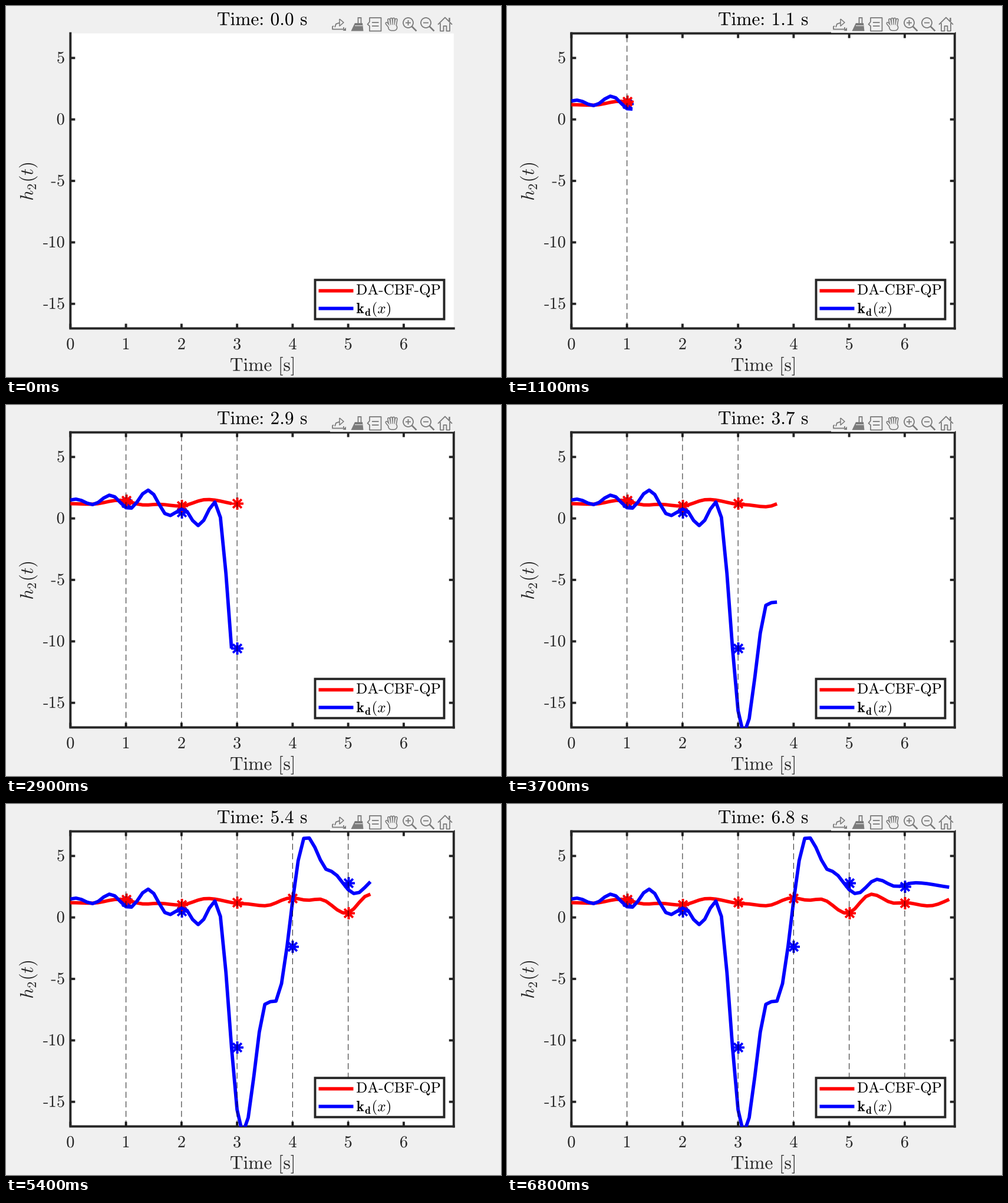
A matplotlib script that plays this animation: 840x630 px, repeating every 6.9 s.

```python
import matplotlib.pyplot as plt
import numpy as np
from matplotlib.animation import FuncAnimation
from matplotlib.patches import Circle, PathPatch, Polygon, Rectangle
from matplotlib.path import Path
from matplotlib.textpath import TextPath
from matplotlib.transforms import Affine2D

plt.rcParams.update({'mathtext.fontset': 'cm', 'path.snap': False})

W, H, DPI = 840, 630, 100
PX = 72 / DPI  # points per pixel
LEFT, RIGHT, TOP, BOTTOM = 109.3, 759.8, 46.5, 547.5
BACK, INK, ICON = '#f0f0f0', '#262626', '#7b7b7b'
TICK, LABEL, LEGEND = 28.5, 31.4, 25.2
AXIS, CURVE = 3.9, 5.8
STEPS = 69

fig = plt.figure(figsize=(W / DPI, H / DPI), dpi=DPI, facecolor=BACK)
ax = fig.add_axes([0, 0, 1, 1])
ax.set_xlim(0, W)
ax.set_ylim(H, 0)
ax.axis('off')


def px(t):
    return LEFT + np.asarray(t) * (RIGHT - LEFT) / 6.9


def py(h):
    return TOP + (7 - np.asarray(h)) * (BOTTOM - TOP) / 24


def line(xs, ys, width, color=INK, z=2, **kw):
    kw = {'solid_capstyle': 'butt', 'solid_joinstyle': 'round', **kw}
    return ax.plot(xs, ys, color=color, lw=width * PX, zorder=z, **kw)[0]


def block(x0, y0, x1, y1, color, z, edge='none', width=0):
    return ax.add_patch(Rectangle((x0, y0), x1 - x0, y1 - y0, facecolor=color,
                                  edgecolor=edge, lw=width * PX, zorder=z))


def outline(s, size):
    """Path and ink width of a text line; hyphens are drawn as bars."""
    parts, x = [], 0
    for i, piece in enumerate([s] if '$' in s else s.split('-')):
        if i:
            x += 0.04 * size if parts else 0
            x1 = x + 0.265 * size
            y0, y1 = 0.187 * size, 0.245 * size
            parts.append(Path([(x, y0), (x1, y0), (x1, y1), (x, y1), (x, y0)],
                              closed=True))
            x = x1 + 0.113 * size
        if piece:
            tex = piece if '$' in piece else rf'$\mathrm{{{piece}}}$'
            path = TextPath((0, 0), tex, size=size)
            box = path.get_extents()
            parts.append(path.transformed(Affine2D().translate(x - box.x0, 0)))
            x += box.width
    return Path.make_compound_path(*parts), x


def text_path(x, y, s, size, align=0, turn=0):
    path, width = outline(s, size)
    move = Affine2D().translate(-align * width, 0).rotate_deg(turn)
    return path.transformed(move.scale(1, -1).translate(x, y))


def write(x, y, s, size, color=INK, align=0, turn=0, z=2):
    patch = PathPatch(text_path(x, y, s, size, align, turn),
                      facecolor=color, lw=0, zorder=z)
    return ax.add_patch(patch)


def title_path(i):
    s = (r'$\mathrm{Time\hspace{-0.2}:\hspace{0.18}%.1f\hspace{0.38}s}$'
         % (i / 10))
    return text_path(359, 32.6, s, LABEL)


def wave(t, keys):
    """Cosine easing from each (time, value) key to the next."""
    times, values = np.array(keys).T
    i = np.searchsorted(times, t, side='right') - 1
    u = (t - times[i]) / (times[i + 1] - times[i])
    return values[i] + (values[i + 1] - values[i]) * (1 - np.cos(np.pi * u)) / 2


# Axes; the closing half of the box appears later
SQUARE = {'solid_capstyle': 'projecting', 'solid_joinstyle': 'miter'}
block(LEFT, TOP, RIGHT, BOTTOM, 'white', 0)
line([LEFT, LEFT, RIGHT], [TOP, BOTTOM, BOTTOM], AXIS, **SQUARE)
late = [line([LEFT, RIGHT, RIGHT], [TOP, TOP, BOTTOM], AXIS, **SQUARE),
        block(550, 43, 760, 45.5, 'white', 3)]
for t in range(7):
    x = px(t)
    line([x, x], [BOTTOM, BOTTOM - 8], AXIS)
    late.append(line([x, x], [TOP, TOP + 8], AXIS))
    write(x, 583, str(t), TICK, align=0.5)
for h in range(-15, 6, 5):
    y = py(h)
    line([LEFT, LEFT + 8], [y, y], AXIS)
    late.append(line([RIGHT, RIGHT - 8], [y, y], AXIS))
    write(98.7, y + 8.6, str(h), TICK, align=1)

write(381, 619.5, r'$\mathrm{Time\hspace{0.38}[s]}$', LABEL)
write(45.6, 329, '$h_2(t)$', LABEL, turn=90)
title = ax.add_patch(PathPatch(title_path(0), facecolor='black', lw=0))

# Curves: turning points, sampled every 0.1 s
time = np.arange(STEPS) / 10
safe = wave(time, [
    (0, 1.2), (0.38, 1.16), (0.88, 1.48), (1.35, 1.09), (1.58, 1.15),
    (1.97, 1.01), (2.46, 1.54), (3.1, 1.12), (3.5, 0.95), (3.98, 1.59),
    (4.27, 1.4), (4.48, 1.49), (4.96, 0.34), (5.4, 1.89), (5.82, 1.16),
    (6, 1.2), (6.43, 0.94), (7.05, 1.75)])
nominal = wave(time, [
    (0, 1.5), (0.1, 1.57), (0.4, 1.13), (0.72, 1.9), (1.06, 0.79),
    (1.4, 2.3), (1.77, 0.22), (2.03, 0.78), (2.3, -0.58), (2.62, 1.35),
    (3.1, -17.6), (3.54, -6.85), (3.68, -6.85), (4.24, 6.6), (4.66, 3.78),
    (5.13, 1.93), (5.5, 3.1), (5.85, 2.52), (6.18, 2.82), (7, 2.4)])

clip = block(LEFT, TOP, RIGHT, BOTTOM, 'none', 0)
curves = []
for values, color, z in ((safe, 'red', 6), (nominal, 'blue', 7)):
    curve = line([], [], CURVE, color, z)
    curve.set_clip_path(clip)
    curves.append((curve, values))

# Each whole second: dashed line and stars holding the previous sample
marks = []
for k in range(1, 7):
    n = 10 * k - 1
    x = px(k)
    marks.append((n, line([x, x], [BOTTOM, TOP], 1.2, 'black', 8, alpha=0.75,
                          linestyle=(0, (8.5, 5)), dash_capstyle='butt')))
    for values, color, z in ((safe, 'red', 5), (nominal, 'blue', 4)):
        marks.append((n, line([x], [py(values[n])], 1, color, z,
                              marker=(8, 2, 0), ms=20.5 * PX, mew=3.5 * PX)))

# Legend
block(524.5, 465.2, 743.5, 531.7, 'white', 10, INK, AXIS)
for y, color in ((483.6, 'red'), (513.6, 'blue')):
    line([530.5, 589.5], [y, y], CURVE, color, 11)
write(595, 490, 'DA-CBF-QP', LEGEND, 'black', z=11)
write(595, 521.5, r'$\mathbf{k_d}(x)$', LEGEND, 'black', z=11)


# Toolbar
def stroke(*points, width=1.8, color=ICON, **kw):
    line(*zip(*points), width, color, 12, **kw)


def solid(*points):
    ax.add_patch(Polygon(points, facecolor=ICON, lw=0, zorder=12))


# export
stroke((556, 34), (554, 35), (554, 39.5), (573, 39.5), (573, 36))
stroke((558, 36), (560, 30.5), (566, 28.5))
stroke((566, 22), (573, 28), (566, 34), (566, 22), width=1.5)
solid((577, 36.5), (577, 42), (571.5, 42))
# brush
block(597.5, 20, 602.5, 30, 'none', 12, ICON, 1.8)
solid((592, 29), (605, 29), (606.5, 42.5), (585.5, 42.5))
stroke((592, 33.5), (605, 33.5), width=1, color=BACK)
# data tip
stroke((617, 27), (617, 20), (636.5, 20), (636.5, 42.5), (617, 42.5),
       (617, 34), (613.5, 31), (617, 27))
for y in (28, 34):
    stroke((621, y), (632.5, y))
# hand: thick strokes hollowed out by thinner ones
for color, cut in ((ICON, 0), (BACK, 3.2)):
    look = {'color': color, 'solid_capstyle': 'round'}
    for j in range(4):
        stroke((649.5 + 4.2 * j, 23.5 - 1.5 * np.sin(j)), (652 + 2.7 * j, 35),
               width=5.2 - cut, **look)
    stroke((646, 29.5), (652, 37), width=5.2 - cut, **look)
    stroke((654, 36.5), (658.5, 36.5), width=12 - cut, **look)
# zoom in and out
for x in (682.5, 712.5):
    ax.add_patch(Circle((x, 28.5), 8.5, fill=False, edgecolor=ICON,
                        lw=1.8 * PX, zorder=12))
    stroke((x - 4.5, 28.5), (x + 4.5, 28.5))
    stroke((x + 6, 34.5), (x + 14, 42.5), width=2.6)
stroke((682.5, 24), (682.5, 33))
# home
stroke((733, 31.5), (745, 19.5), (757, 31.5))
stroke((752.5, 26), (752.5, 20), width=2.5)
stroke((737, 29), (737, 42.5), (742.5, 42.5), (742.5, 34), (747.5, 34),
       (747.5, 42.5), (753, 42.5), (753, 29))


def draw(i):
    for curve, values in curves:
        curve.set_data(px(time[:i + 1]), py(values[:i + 1]))
    for n, artist in marks:
        artist.set_visible(i >= n)
    for artist in late:
        artist.set_visible(i >= 9)
    title.set_path(title_path(i))
    return []


ani = FuncAnimation(fig, draw, frames=STEPS, interval=100, repeat=True,
                    repeat_delay=0)
plt.show()
```
